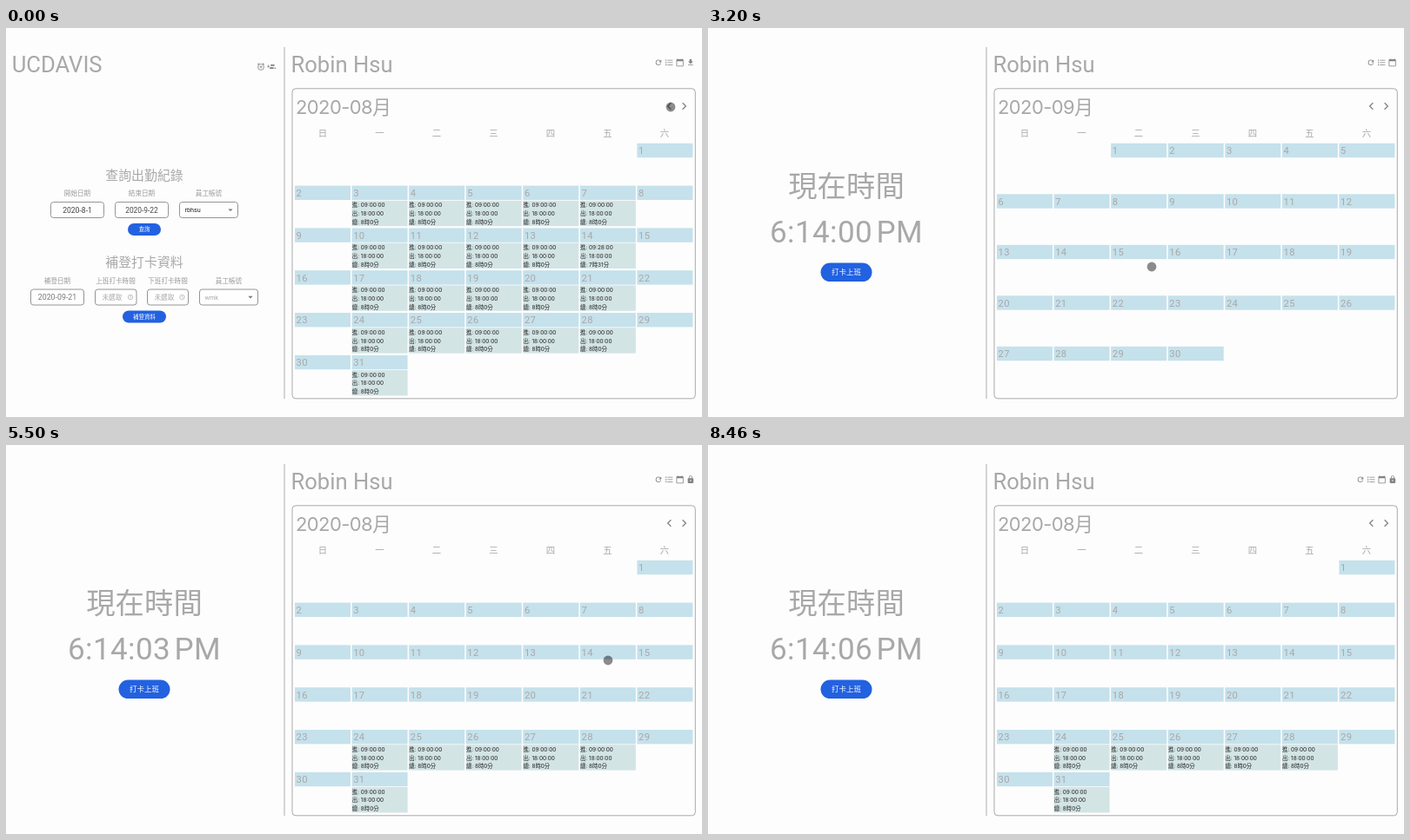
Recreate the animation shown at these times as an HTML page. Size 800 by 448 pixels, loop 8500 ms.

```html
<!DOCTYPE html>
<html lang="zh-Hant">
<head>
<meta charset="utf-8">
<style>
html, body { margin: 0; width: 100%; height: 100%; overflow: hidden; background: #fdfdfd; }
svg { display: block; width: 800px; height: 448px; font-family: Roboto, "Noto Sans CJK TC", "Noto Sans CJK JP", sans-serif; }
text { white-space: pre; }
.inter { font-family: Inter, "Noto Sans CJK TC", "Noto Sans CJK JP", sans-serif; }
#clock { letter-spacing: .4px; word-spacing: -4.5px; }
</style>
</head>
<body>
<svg id="stage" viewBox="0 0 800 448"></svg>
<script>
const GRAY = '#a8a8a8', BLUE = '#2261e0', INK = '#222';
const ICONS = {
  refresh: 'M17.65 6.35A7.96 7.96 0 0 0 12 4a8 8 0 1 0 7.73 10h-2.08A6 6 0 1 1 12 6c1.66 0 3.14.69 4.22 1.78L13 11h7V4z',
  list: 'M1.5 4h3v3h-3zm0 6.5h3v3h-3zm0 6.5h3v3h-3zM7 4.5h15v2H7zM7 11h15v2H7zm0 6.5h15v2H7z',
  calendar: 'M20 3h-1V1h-2v2H7V1H5v2H4a2 2 0 0 0-2 2v16a2 2 0 0 0 2 2h16a2 2 0 0 0 2-2V5a2 2 0 0 0-2-2zm0 18H4V8h16z',
  download: 'M19 9h-4V3H9v6H5l7 7zM5 18v2h14v-2z',
  lock: 'M18 8h-1V6A5 5 0 0 0 7 6v2H6a2 2 0 0 0-2 2v10a2 2 0 0 0 2 2h12a2 2 0 0 0 2-2V10a2 2 0 0 0-2-2zm-6 9a2 2 0 1 1 0-4 2 2 0 0 1 0 4zm3.1-9H8.9V6a3.1 3.1 0 0 1 6.2 0z',
  alarm: 'M12 4a9 9 0 1 0 0 18 9 9 0 0 0 0-18zm0 16a7 7 0 1 1 0-14 7 7 0 0 1 0 14zM22 5.7l-4.6-3.9-1.3 1.5 4.6 3.9zM7.9 3.4L6.6 1.9 2 5.7l1.3 1.5zM13 9h-2v3H8v2h3v3h2v-3h3v-2h-3z',
  people: 'M8 10H5V7H3v3H0v2h3v3h2v-3h3zm10 1a3 3 0 1 0 0-6 3 3 0 0 0 0 6zm-5 0a3 3 0 1 0 0-6 3 3 0 0 0 0 6zm0 2c-2 0-6 1-6 3v2h12v-2c0-2-4-3-6-3zm6.6.2A4.2 4.2 0 0 1 21 16v2h3v-2c0-1.5-2.4-2.5-4.4-2.8z'
};

const text = (x, y, size, str, fill = GRAY, extra = '') =>
  `<text x="${x}" y="${y}" font-size="${size}" fill="${fill}" ${extra}>${str}</text>`;
const mid = (x, y, size, str, fill, extra = '') => text(x, y, size, str, fill, 'text-anchor="middle" ' + extra);
const rect = (x, y, w, h, fill, extra = '') =>
  `<rect x="${x}" y="${y}" width="${w}" height="${h}" fill="${fill}" ${extra}/>`;
const icon = (name, x, y) =>
  `<path d="${ICONS[name]}" fill="#848484" fill-rule="evenodd" transform="translate(${x} ${y}) scale(.41) translate(-12 -12)"/>`;
const line = (d, color, width) => `<path d="${d}" fill="none" stroke="${color}" stroke-width="${width}"/>`;
const button = (x, y, w, h, size, label) =>
  rect(x, y, w, h, BLUE, `rx="${h / 2}"`) + mid(x + w / 2, y + h / 2 + size * .37, size, label, '#fff');
const box = (x, y, w) => rect(x, y, w, 18, '#fefefe', 'rx="3" stroke="#8a8a8a" stroke-width=".9"');
const arrow = (x, y) => `<path d="M${x - 2.6} ${y - 1.2}h5.2l-2.6 2.7z" fill="#777"/>`;
const label = (x, y, str) => mid(x, y, 7.6, str, '#999');

function timeField(x, w) {
  const cx = x + w - 7;
  return box(x, 301, w) + text(x + 8, 312.8, 7.6, '未選取', '#aaa') +
    `<circle cx="${cx}" cy="310" r="2.7" fill="none" stroke="#aaa" stroke-width=".7"/>` +
    line(`M${cx} 308.3v1.8l1.2.8`, '#aaa', .6);
}

const adminPanel =
  text(6.7, 50.8, 25.6, 'UCDAVIS') + icon('alarm', 293, 44.5) + icon('people', 305, 44.5) +
  mid(159, 174.6, 14.9, '查詢出勤紀錄') +
  label(82, 193, '開始日期') + label(156, 193, '結束日期') + label(233, 193, '員工帳號') +
  box(51.5, 200.5, 61) + box(125.5, 200.5, 61) + box(199.5, 200.5, 67) +
  mid(82, 212.6, 8.6, '2020-8-1', '#444') + mid(156, 212.6, 8.4, '2020-9-22', '#444') +
  text(205.5, 212, 7.2, 'rbhsu', INK) + arrow(258, 209.6) +
  button(140, 225, 38, 14, 6.5, '查詢') +
  mid(159, 274.6, 14.9, '補登打卡資料') +
  label(59, 293.8, '補登日期') + label(126, 293.8, '上班打卡時間') +
  label(186, 293.8, '下班打卡時間') + label(256, 293.8, '員工帳號') +
  box(28.5, 301, 61) + mid(59, 313.2, 8.8, '2020-09-21', '#777') +
  timeField(102.5, 47.5) + timeField(162.5, 47) +
  box(222.5, 301, 67) + text(228.5, 312.5, 7.2, 'wmk', GRAY) + arrow(281, 310) +
  button(134, 325.5, 50, 14, 6.5, '補登資料');

const clockPanel =
  mid(159, 194.4, 33.4, '現在時間') + mid(159, 247, 35, '', GRAY, 'id="clock"') +
  button(129.5, 270.5, 59, 21.6, 8.5, '打卡上班');

const frame =
  line('M320 22V427', '#b4b4b4', 1.1) + text(327.5, 50.8, 25.6, 'Robin Hsu') +
  rect(329, 69.8, 463.3, 357, 'none', 'rx="4" stroke="#959595" stroke-width=".8"') +
  line('M764.4 86.2l-3.8 3.8 3.8 3.8M777.6 86.2l3.8 3.8-3.8 3.8', '#808080', 1.25) +
  [...'日一二三四五六'].map((d, i) => mid(364 + i * 65.5, 124.8, 10.4, d)).join('');

// A month: heading, weekday of day 1, day count, row pitch, worked(day), exceptions by day
function month(title, first, count, pitch, worked, special = {}) {
  let out = text(333, 98.6, 22, title, GRAY, 'class="inter" letter-spacing="-.6"');
  for (let day = 1; day <= count; day++) {
    const slot = first + day - 1, col = slot % 7;
    const x = 332 + col * 65.57, y = 132.8 + Math.floor(slot / 7) * pitch;
    out += rect(x, y, 64, 16.4, '#c5e1eb') + text(x + 1.6, y + 12.4, 11.2, day, GRAY, 'letter-spacing=".4"');
    if (col % 6 && worked(day)) {
      const [start, end, total] = special[day] || ['09:00:00', '18:00:00', '8時0分'];
      out += rect(x, y + 17.2, 64, 29.4, '#d3e4e5');
      ['進: ' + start, '出: ' + end, '總: ' + total].forEach((s, i) =>
        out += text(x + .2, y + 24.8 + i * 9.75, 6.4, s, INK, 'class="inter"'));
    }
  }
  return out;
}
const august = (worked, special) => month('2020-08月', 6, 31, 48.8, worked, special);
const september = worked => month('2020-09月', 2, 30, 58.5, worked, {
  14: ['09:04:00', '18:00:00', '7時55分'],
  18: ['08:59:00', '18:03:00', '8時4分'],
  21: ['08:57:37', '18:01:59', '8時4分']
});
const tools = (x, ...names) => names.map((n, i) => icon(n, x + i * 12.3, 39.8)).join('');
const userTools = tools(750, 'refresh', 'list', 'calendar', 'lock');

// [start, end, content]
const layers = [
  [0, 8500, frame],
  [0, 1350, adminPanel + august(() => true, { 14: ['09:28:00', '18:00:00', '7時31分'] }) +
    tools(750, 'refresh', 'list', 'calendar', 'download')],
  [1350, 8500, clockPanel],
  [1350, 3330, september(() => false) + tools(762, 'refresh', 'list', 'calendar')],
  [3330, 4700, september(d => d < 22) + userTools],
  [4700, 8500, august(d => d > 23) + userTools],
  [1350, 2250, '<path d="M0 438H264q2 0 2 2V448H0z" fill="#898989"/>' +
    text(1.6, 445.8, 7, 'Waiting for localhost...', '#eee')]
];

const stage = document.getElementById('stage');
stage.innerHTML = layers.map(l => `<g>${l[2]}</g>`).join('') +
  '<circle id="pointer" r="5.4" fill="#000" fill-opacity=".45"/>';
const groups = stage.querySelectorAll('g');
const clock = document.getElementById('clock'), pointer = document.getElementById('pointer');

// Pointer stops: [time, x, y]
const stops = [
  [0, 764, 91], [200, 764, 91], [1150, 293, 45], [1800, 293, 45], [2400, 510, 275],
  [3530, 510, 275], [3990, 795, 89], [4080, 795, 89], [4400, 764, 91], [5230, 764, 91],
  [5500, 692, 248], [6450, 705, 306], [6500, 705, 306], [6900, 592, 190],
  [7060, 542, 217], [7150, 542, 217], [7600, 500, -12], [8500, 500, -12]
];

function draw(now) {
  const t = now % 8500;
  layers.forEach(([from, to], i) => groups[i].style.display = t >= from && t < to ? '' : 'none');
  clock.textContent = t < 2300 ? '00:00:00 AM' : `6:14:0${Math.floor((t - 2300) / 1000)} PM`;
  const i = stops.findIndex(s => s[0] > t);
  const [t0, x0, y0] = stops[i - 1], [t1, x1, y1] = stops[i];
  const p = (t - t0) / (t1 - t0), e = p * p * (3 - 2 * p);
  pointer.setAttribute('cx', x0 + (x1 - x0) * e);
  pointer.setAttribute('cy', y0 + (y1 - y0) * e);
}

const begin = performance.now();
function tick() {
  draw(performance.now() - begin);
  requestAnimationFrame(tick);
}
tick();
</script>
</body>
</html>
```
